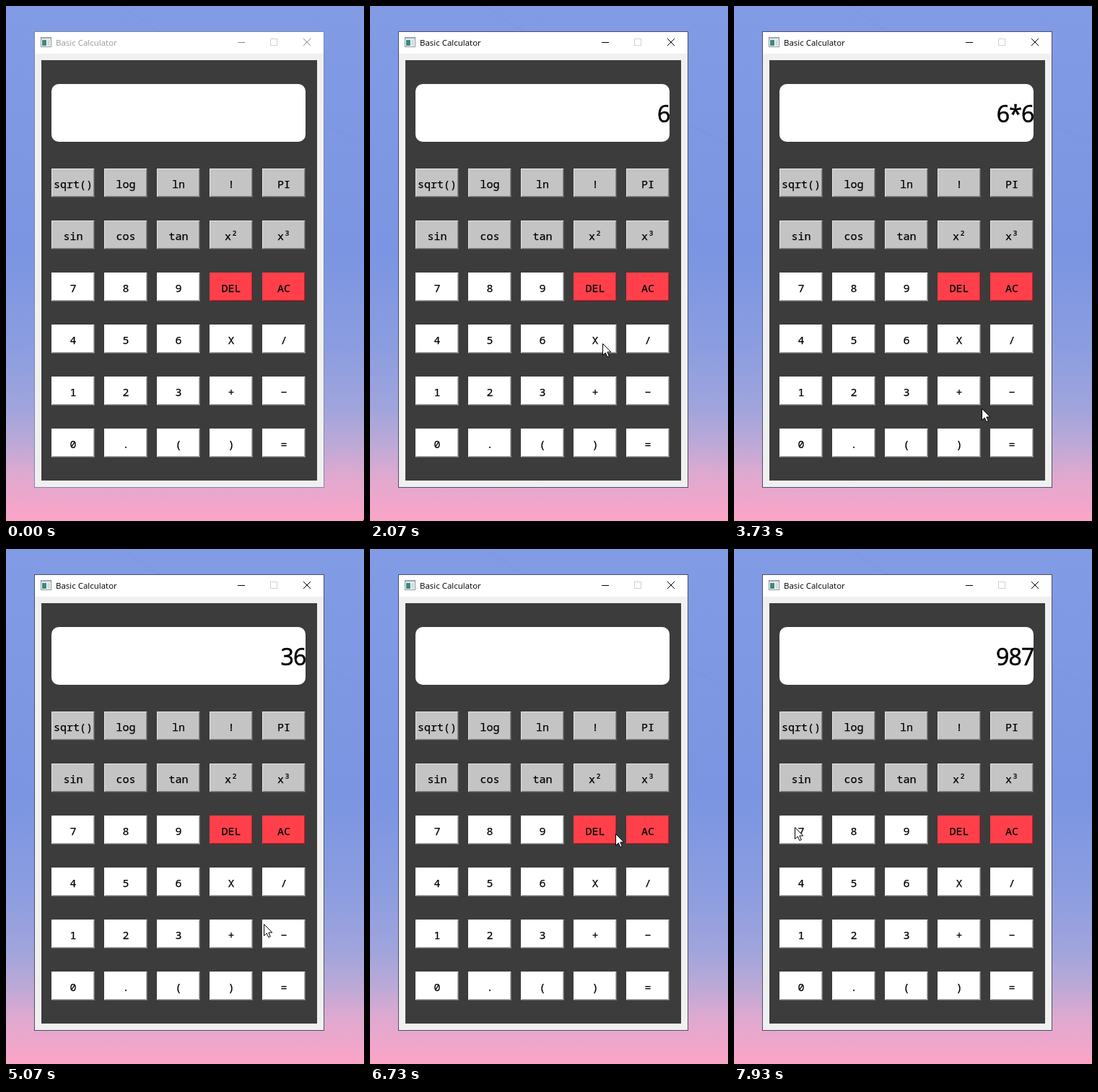
An HTML page that plays this animation: 496 px wide and 713 px high, repeating every 8000 ms.

```html
<!DOCTYPE html>
<html lang="en">
<head>
<meta charset="utf-8">
<title>Basic Calculator</title>
<style>
  html, body { margin: 0; height: 100%; overflow: hidden; }
  svg { display: block; width: 496px; height: 713px; }
  .key text {
    font: 15px "Noto Sans Mono", "DejaVu Sans Mono", monospace;
    text-anchor: middle; stroke: #000; stroke-width: .25px;
  }
  .key path { fill: none; stroke: #000; }
  .key .lit { stroke: #fff; stroke-opacity: .6; }
  .key .dim { stroke-opacity: .55; }
  .key .mid { stroke-opacity: .32; }
  .key.red .lit { stroke-opacity: 0; }
  .key.down text { transform: translate(1px, 1px); }
  .key.down .bevel { transform: rotate(180deg); transform-origin: 30px 20px; }
  #title { font: 11.5px "Open Sans", "Noto Sans", sans-serif; }
  #out {
    font: 32px "Open Sans", "Noto Sans", sans-serif; letter-spacing: -.8px;
    text-anchor: end; stroke: #000; stroke-width: .6px;
  }
</style>
</head>
<body>
<svg viewBox="0 0 496 713">
  <defs>
    <linearGradient id="sky" x2="0" y2="1">
      <stop offset="0" stop-color="#829be5"/>
      <stop offset=".48" stop-color="#7b95e2"/>
      <stop offset=".66" stop-color="#8b9de0"/>
      <stop offset=".78" stop-color="#a0a4dc"/>
      <stop offset=".85" stop-color="#bca9d7"/>
      <stop offset=".91" stop-color="#dfa9d0"/>
      <stop offset="1" stop-color="#fca4c7"/>
    </linearGradient>
  </defs>
  <rect width="496" height="713" fill="url(#sky)"/>
  <path d="M160 0Q320 110 441 165L496 190" fill="none" stroke="#7089d4" stroke-opacity=".35"/>

  <rect id="frame" x="39.5" y="35.5" width="401" height="631" fill="#f0f0f0"/>
  <rect x="40" y="36" width="400" height="30" fill="#fff"/>
  <rect x="48.5" y="43.5" width="14" height="13" fill="#fff" stroke="#8c9298"/>
  <rect x="49" y="44" width="13" height="2" fill="#c3cbd2"/>
  <rect x="50" y="47" width="6" height="8" fill="#3d8a80"/>
  <rect x="57" y="47" width="4" height="8" fill="#cfdcdf"/>
  <text id="title" x="69" y="55">Basic Calculator</text>
  <path id="caption" d="M321 50.5h10M412 45l10 10M422 45l-10 10"/>
  <rect x="366.5" y="45.5" width="9" height="9" fill="none" stroke="#d0d0d0"/>

  <rect x="49" y="75" width="382" height="582" fill="#3c3c3c"/>
  <rect x="63" y="108" width="352" height="80" rx="10" fill="#fff"/>
  <text id="out" x="415.5" y="161"></text>
  <g id="keys"></g>
  <path id="cursor" d="M.5 .5V16.5L4.2 13 6.8 18.6 9.3 17.5 6.8 12H11.8Z" fill="#fff" stroke="#000"/>
</svg>
<script>
const $ = id => document.getElementById(id);
const LOOP = 8000, TICKS = 120, TICK = LOOP / TICKS;

const labels = 'sqrt() log ln ! PI sin cos tan x² x³ 7 8 9 DEL AC 4 5 6 X / 1 2 3 + − 0 . ( ) ='.split(' ');
const isRed = label => label === 'DEL' || label === 'AC';
const colour = (label, i) => i < 10 ? '#c4c4c4' : isRed(label) ? '#ff404b' : '#fff';

$('keys').innerHTML = labels.map((label, i) => `
  <g class="key ${isRed(label) ? 'red' : ''}"
     transform="translate(${63 + i % 5 * 73} ${225 + Math.floor(i / 5) * 72})">
    <rect width="60" height="40" fill="${colour(label, i)}"/>
    <g class="bevel">
      <path class="lit" d="M.5 39V.5H59"/>
      <path class="dim" d="M0 39.5H59.5V0"/>
      <path class="mid" d="M1 38.5H58.5V1"/>
    </g>
    <text x="30" y="27">${label}</text>
  </g>`).join('');
const keys = [...$('keys').children];

// Each move: ticks it lasts, where it ends, how far it bows, then the key clicked and when
const moves = [
  { from: 0, to: 13, end: [245, 457], bow: [-2, 5], key: '6', press: 23 },
  { from: 26, to: 35, end: [316, 472], bow: [28, 0], key: 'X', press: 37 },
  { from: 39, to: 47, end: [238, 460], key: '6', press: 49 },
  { from: 51, to: 60, end: [381, 602], bow: [6, -1], key: '=', press: 66 },
  { from: 71, to: 84, end: [387, 390], bow: [-29, 25] },
  { from: 87, to: 90, end: [315, 380], key: 'DEL', press: 94 },
  { from: 95, to: 97, end: [366, 392], key: 'AC', press: 99 },
  { from: 100, to: 106, end: [231, 390], bow: [9, 5], key: '9', press: 108 },
  { from: 109, to: 111, end: [158, 388], key: '8', press: 113 },
  { from: 114, to: 117, end: [84, 385], key: '7', press: 118 }
];

function enter(text, key) {
  if (key === 'AC') return '';
  if (key === 'DEL') return text.slice(0, -1);
  if (key === '=') return String(text.split('*').reduce((a, b) => a * b));
  return text + (key === 'X' ? '*' : key);
}

const easeOut = t => 1 - (1 - t) ** 1.45;

function stateAt(tick) {
  let tip = [495, 711], text = '', held = null;
  for (const { from, to, end, bow = [0, 0], key, press } of moves) {
    if (tick < from) break;
    const t = Math.min(1, (tick - from) / (to - from));
    tip = tip.map((p, i) => p + (end[i] - p) * easeOut(t) + bow[i] * 4 * t * (1 - t));
    if (tick === press) held = key;
    if (tick > press) text = enter(text, key);
  }
  return { tip: tip.map(Math.round), text, held };
}

function draw(ms) {
  const tick = Math.floor((ms + 3.4) / TICK) % TICKS;
  const { tip, text, held } = stateAt(tick);
  const active = tick >= moves[0].press;
  keys.forEach((g, i) => g.classList.toggle('down', labels[i] === held));
  $('out').textContent = text;
  $('title').setAttribute('fill', active ? '#000' : '#999');
  $('caption').setAttribute('stroke', active ? '#000' : '#888');
  $('frame').setAttribute('stroke', active ? '#4b5068' : '#7e86ae');
  $('cursor').setAttribute('transform', `translate(${tip})`);
}

let start;
function loop(now) {
  start ??= now;
  draw((now - start) % LOOP);
  requestAnimationFrame(loop);
}
draw(0);
requestAnimationFrame(loop);
</script>
</body>
</html>
```
